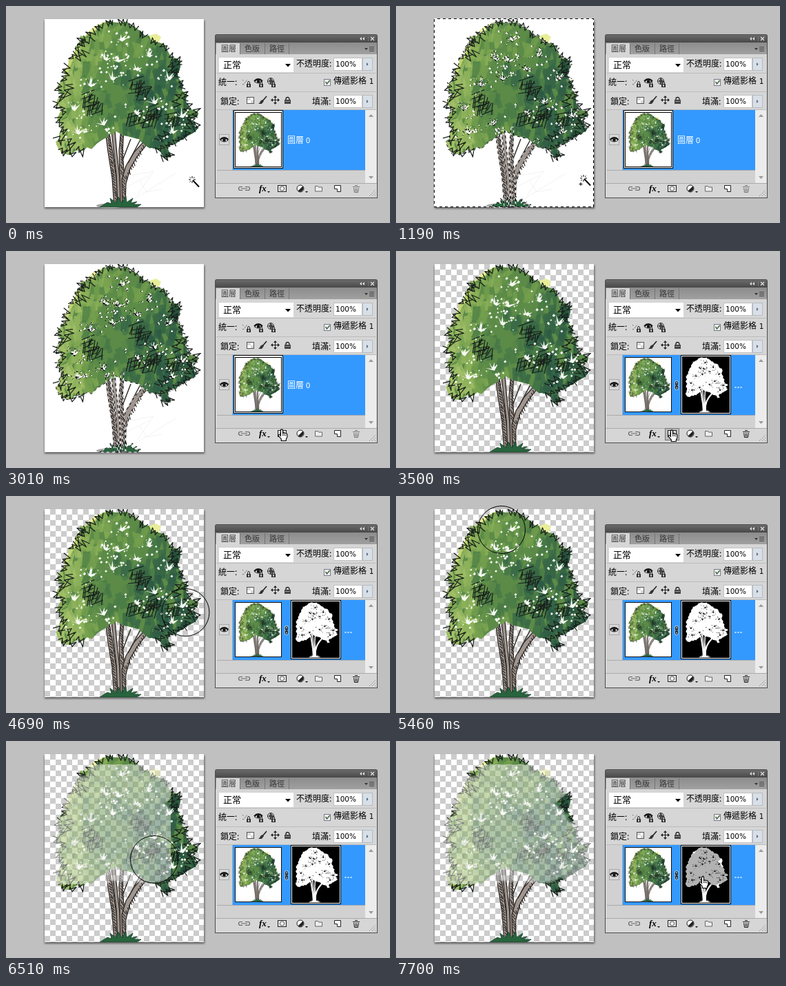
These frames come from a looping animation (557 by 315 pixels, 8000 ms). An HTML page:

```html
<!DOCTYPE html>
<html lang="zh-Hant">
<head>
<meta charset="utf-8">
<title>Layer mask</title>
<style>
html, body { margin: 0; width: 100%; height: 100%; overflow: hidden; background: #c0c0c0; }
svg { display: block; width: 557px; height: 315px; }
text { font: 12px "Noto Sans CJK TC", "Noto Sans CJK", "Noto Sans CJK JP", sans-serif; }
.tab { font-size: 11px; fill: #333; }
.num { font: 10.5px "DejaVu Sans", sans-serif; }
rect { shape-rendering: crispEdges; }
.ants path, .ants rect { fill: none; stroke-width: 1; }
.line { fill: none; stroke: #222; }
</style>
</head>
<body>
<svg viewBox="0 0 557 315" xmlns="http://www.w3.org/2000/svg">
  <defs>
    <pattern id="checker" x="56" y="19" width="16" height="16" patternUnits="userSpaceOnUse">
      <rect width="16" height="16" fill="#fff"/>
      <path d="M8 0h8v8h-8zM0 8h8v8h-8z" fill="#ccc"/>
    </pattern>
    <linearGradient id="bar" x2="0" y2="1">
      <stop stop-color="#6b6b6b"/><stop offset="1" stop-color="#484848"/>
    </linearGradient>
    <linearGradient id="tabs" x2="0" y2="1">
      <stop stop-color="#8c8c8c"/><stop offset="1" stop-color="#a0a0a0"/>
    </linearGradient>
    <filter id="soft" x="-10%" y="-10%" width="120%" height="120%"><feGaussianBlur stdDeviation="1.8"/></filter>
    <clipPath id="sheet"><rect x="56" y="19" width="231" height="273"/></clipPath>
    <clipPath id="crownClip"></clipPath>
    <clipPath id="silhouette"></clipPath>
    <mask id="fade" maskUnits="userSpaceOnUse" x="0" y="0" width="557" height="315">
      <rect width="557" height="315" fill="#fff"/>
      <path id="paint" fill="none" stroke="#000" stroke-opacity=".53" stroke-width="68" stroke-linecap="round" stroke-linejoin="round" filter="url(#soft)"/>
    </mask>
    <g id="tree"></g>
    <g id="backdrop">
      <rect x="56" y="19" width="231" height="273" fill="#fff"/>
      <ellipse cx="150" cy="290" rx="19" ry="3.5" fill="#a5a5a5"/>
      <path d="M181 246L214 240L190 275M186 280L246 243M194 254L204 270L226 266M176 262L208 246" fill="none" stroke="#efefef" stroke-width=".8"/>
    </g>
    <g id="hand">
      <path d="M-2.5-7.5q1.5-1.2 3 0v5l2-.6 1.8.9 1.6 0 1 1.4v4l-1.6 3v2.3h-7v-2.5l-4.3-5q0-2 2-1.3l1.5 1.6z" fill="#fff" stroke="#000" stroke-width="1.1"/>
      <path d="M.6-1.5v2.6M2.7-1.3v2.4M4.7-.6v2" stroke="#000" stroke-width=".9"/>
    </g>
    <g id="eye">
      <path d="M-5.500 1Q0-5 5.500 1Q0 5-5.500 1Z" fill="#eee" stroke="#222" stroke-width="1"/>
      <path d="M-6 0Q0-6 6 0" fill="none" stroke="#111" stroke-width="1.800"/>
      <circle r="2.300" cy=".5" fill="#111"/>
    </g>
    <g id="lock">
      <path d="M-1.500 0v-1.500a1.500 2 0 0 1 3 0v1.500" class="line"/>
      <rect x="-3" y="0" width="6" height="5" fill="#333"/>
      <rect x="-1" y="1" width="2" height="3" fill="#bbb"/>
    </g>
  </defs>

  <rect width="557" height="315" fill="#c0c0c0"/>
  <rect x="56" y="21" width="232" height="273" fill="#555" filter="url(#soft)"/>
  <rect x="56" y="19" width="231" height="273" fill="url(#checker)"/>
  <use id="paper" href="#backdrop"/>
  <g clip-path="url(#sheet)"><use href="#tree" mask="url(#fade)"/></g>
  <g id="ants" class="ants"></g>

  <g id="panel">
    <path d="M303 279V44q0-3 3-3h230q3 0 3 3v235z" fill="#4c4c4c"/>
    <path d="M304 53v-9q0-2 2-2h230q2 0 2 2v9z" fill="url(#bar)"/>
    <path d="M516 45l-3 2.5 3 2.5zM520 45l-3 2.5 3 2.5z" fill="#ddd"/>
    <path d="M525.500 44v7" stroke="#777"/>
    <path d="M529 45l5 5m0-5l-5 5" stroke="#ddd" stroke-width="1.3"/>
    <rect x="304" y="53" width="234" height="225" fill="#d6d6d6"/>
    <rect x="304" y="53" width="234" height="17" fill="url(#tabs)"/>
    <rect x="305" y="54" width="34" height="17" fill="#d6d6d6"/>
    <path d="M339.500 54v16M375.500 54v16M410.500 54v16" stroke="#757575"/>
    <text class="tab" x="312" y="66">圖層</text><text class="tab" x="346" y="66">色版</text><text class="tab" x="382" y="66">路徑</text>
    <path d="M520 61h5l-2.500 3z" fill="#333"/>
    <path d="M527 59.500h7M527 61.500h7M527 63.500h7M527 65.500h7" stroke="#444" stroke-width=".8"/>

    <rect x="309" y="75" width="108" height="21" fill="#fff"/>
    <text x="315" y="90" style="font-size:13px">正常</text>
    <path d="M405 84h8l-4 4.500z"/>
    <text x="421" y="88">不透明度:</text>
    <text x="308" y="115">統一:</text>
    <text x="311" y="143">鎖定:</text>
    <text x="444" y="143">填滿:</text>
    <text x="475" y="113">傳遞影格 <tspan class="num" dx="1">1</tspan></text>
    <g id="fields"></g>
    <path d="M305 97.500h232M305 124.500h232M305 150.500h232" stroke="#bcbcbc"/>

    <path d="M343 107l2 2M346 112l4-5M343 114l3-1" stroke="#666" stroke-dasharray="2 1"/>
    <use href="#lock" x="352" y="113"/>
    <use href="#eye" x="366" y="109"/><use href="#lock" x="370" y="113"/>
    <circle cx="384" cy="109" r="4.500" fill="#ddd" stroke="#222"/><path d="M384 105l3 4-3 4-2-4zM380 109h8" fill="#555" stroke="#333"/>
    <use href="#lock" x="388" y="113"/>
    <rect x="461.500" y="106.500" width="9" height="9" fill="#f4f4f4" stroke="#778"/>
    <path d="M463.500 110l2 3 4-5" fill="none" stroke="#464" stroke-width="1.500"/>

    <rect x="349.500" y="132.500" width="10" height="9" fill="#fff" stroke="#555"/>
    <path d="M350 133h5v4h-5zM355 137h4v4h-4z" fill="#d8d8d8"/>
    <path d="M378 131l-6 7" stroke="#222" stroke-width="1.600"/><path d="M372 136l2 2-3 4h-5q3-2 3-4z" fill="#333"/>
    <path d="M386 136.500h10M390.500 132v10" stroke="#222"/>
    <path d="M390.500 130l2.500 3h-5zM390.500 143l2.500-3h-5zM384 136.500l3-2.500v5zM397 136.500l-3-2.500v5z" fill="#222"/>
    <path d="M406 137v-2a2.500 2.500 0 0 1 5 0v2" class="line" stroke-width="1.300"/>
    <rect x="404" y="136" width="9" height="6" fill="#444"/><rect x="405" y="138" width="7" height="1" fill="#999"/>

    <rect x="306" y="151" width="215" height="106" fill="#d1d1d1"/>
    <rect x="329" y="151" width="192" height="87" fill="#39f"/>
    <path d="M306 238.500h215M328.500 151v87" stroke="#aaa"/>
    <rect x="309.500" y="186.500" width="14" height="15" fill="#d8d8d8" stroke="#a8a8a8"/>
    <use href="#eye" x="316.500" y="194"/>
    <rect x="521" y="151" width="16" height="106" fill="#ececec"/>
    <path d="M526 161h7l-3.500-4zM526 247h7l-3.500 4z" fill="#999"/>
    <rect x="332.500" y="154.500" width="67" height="79" fill="#fff" stroke="#111"/>
    <g transform="translate(333 155) scale(.287) translate(-56 -19)">
      <g clip-path="url(#sheet)"><use href="#backdrop"/><use href="#tree"/></g>
    </g>
    <g id="plain">
      <rect x="331" y="153" width="70" height="82" fill="none" stroke="#fff" stroke-width="2"/>
      <rect x="330.500" y="151.500" width="71" height="84" fill="none" stroke="#000"/>
      <rect x="332.500" y="154.500" width="67" height="79" fill="none" stroke="#000"/>
      <text x="408" y="199" fill="#fff">圖層 <tspan class="num">0</tspan></text>
    </g>
    <g id="masked">
      <rect x="404" y="188" width="6" height="14" rx="3" fill="#ddd" opacity=".6"/>
      <path d="M405.500 194v-3a1.500 1.500 0 0 1 3 0v3zM405.500 196v3a1.500 1.500 0 0 0 3 0v-3zM407 192v6" class="line" stroke-width="1.200"/>
      <rect x="414" y="152" width="71" height="84" fill="#fff"/>
      <rect x="413.500" y="151.500" width="72" height="85" fill="none" stroke="#000"/>
      <rect x="415" y="153" width="69" height="82"/>
      <g transform="translate(415 153.500) scale(.297) translate(-56 -19)">
        <g clip-path="url(#sheet)"><g clip-path="url(#silhouette)">
          <rect x="56" y="19" width="231" height="273" fill="#fff"/>
          <path id="thumbPaint" fill="none" stroke="#b2b2b2" stroke-width="69" stroke-linecap="round" stroke-linejoin="round"/>
        </g><path id="holes"/></g>
      </g>
      <path d="M491.500 198h2M495.500 198h2M499.500 198h2" stroke="#fff" stroke-width="1.500"/>
    </g>

    <path d="M304 257.500h234" stroke="#aaa"/>
    <rect id="button" x="390.500" y="257.500" width="20" height="17" fill="#bbb" stroke="#777"/>
    <g class="line">
      <path d="M343 262.500h-3a2.500 2.500 0 0 0 0 5h3M347 262.500h4a2.500 2.500 0 0 1 0 5h-4M341 265h9" stroke="#666" stroke-width="1.200"/>
      <rect x="394.500" y="260.500" width="12" height="9" fill="#e2e2e2"/>
      <circle cx="400.500" cy="265" r="3" fill="#fff" stroke="#555"/>
      <circle cx="427" cy="265" r="5" fill="#fff"/>
      <path d="M448.500 261.500h4l1 1.500h5v6h-10z" fill="#eee" stroke="#666"/>
      <path d="M476.500 260.500h9v9h-5v-4h-4z" fill="#fff"/>
      <path id="trash" d="M503 262.500h10M506 260.500h4M504.500 264l1 6.500h5l1-6.500M507 264.500v5M509 264.500v5"/>
    </g>
    <path d="M430.500 261.500a5 5 0 0 1-7 7z" fill="#222"/><path d="M434 269h4l-2 2zM379 269h4l-2 2z"/>
    <text x="367" y="269" style="font:italic bold 13px 'Liberation Serif',serif">fx</text>
    <path d="M527 276l9-9M531 276l5-5M535 276l1-1" stroke="#888" stroke-dasharray="1.500 1.500"/>
  </g>

  <g id="wand">
    <path d="M0-5v3M0 2v3M-5 0h3M2 0h3M-3.500-3.500l1.500 1.500M3.500-3.500l-1.500 1.500M-3.500 3.500l1.500-1.500" stroke="#000"/>
    <path d="M1 1l9 9.500" stroke="#000" stroke-width="2"/>
    <path id="plus" d="M-6.500 8.500h5M-4 6v5" stroke="#000"/>
  </g>
  <circle id="brush" r="34.500" fill="none" stroke="#000"/>
  <use id="pointer" href="#hand"/>
</svg>

<script>
const $ = id => document.getElementById(id);
const LOOP = 8000, STEP = 70;
let seed = 17;
const rnd = () => (seed = seed * 16807 % 2147483647) / 2147483647;
const jit = r => (rnd() * 2 - 1) * r;
const n1 = v => v.toFixed(1);
const path = (d, attrs) => `<path d="${d}" ${attrs || ''}/>`;
const pairs = s => s.split(' ').map(p => p.split(',').map(Number));

// Foliage
const edge = pairs('110,45 124,37 136,28 152,23 170,22 187,28 200,41 217,51 232,60 243,74 253,82 249,99 256,115 261,132 266,149 277,157 271,166 278,178 262,190 249,198 236,204 238,220 231,222 222,210 207,204 191,194 160,183 147,190 126,205 105,211 91,215 79,211 74,195 81,180 75,166 80,150 72,143 79,130 75,116 85,102 85,90 96,71 106,57');

function ragged(pts) {
  let d = '';
  pts.forEach(([x, y], i) => {
    const [u, v] = pts[(i + 1) % pts.length];
    for (let k = 0; k < 3; k++) {
      const f = k / 3;
      d += (d ? 'L' : 'M') + n1(x + (u - x) * f + jit(2.5)) + ' ' + n1(y + (v - y) * f + jit(2.5));
    }
  });
  return d + 'Z';
}

// Light towards the upper left, a dark band on the right below y = 82
function leafColor(x, y) {
  const band = y > 82 && x > 112 ? .2 : 0;
  const glow = y > 168 && x < 165 ? .12 : 0;
  const tone = .08 + (x - 70) / 210 * .6 + band - glow + jit(.13);
  const scale = ['#a3c068', '#8bb058', '#759f4e', '#5c8b48', '#477846', '#376746', '#2c5a44', '#234b3a'];
  return scale[Math.max(0, Math.min(7, Math.floor(tone * 8)))];
}

function dabs() {
  let s = '';
  for (let i = 0; i < 420; i++) {
    const x = 66 + rnd() * 214, y = 18 + rnd() * 200;
    s += path(`M${n1(x)} ${n1(y)}l${n1(jit(6))} ${n1(6 + rnd() * 10)}`,
      `stroke="${leafColor(x, y)}" stroke-width="${n1(6 + rnd() * 6)}" opacity=".75"`);
  }
  return s;
}

// Pen line that swings out from the crown and back
function spikes(x, y, n, size) {
  const a = Math.atan2(y - 125, x - 165);
  let d = `M${n1(x)} ${n1(y)}`;
  for (let i = 0; i < n; i++) {
    const out = (i % 2 ? -.5 : .7) * size + jit(2), along = (i - n / 2) * size * .45 + jit(2);
    d += `L${n1(x + Math.cos(a) * out - Math.sin(a) * along)} ${n1(y + Math.sin(a) * out + Math.cos(a) * along)}`;
  }
  return d;
}

function inkLines() {
  let d = '';
  edge.forEach(([x, y], i) => {
    if (i < 24 || i > 28) d += spikes(x + (165 - x) * .03, y + (125 - y) * .03, 5, 7);
  });
  pairs('112,70 119,52 92,120 90,195 247,138 240,95 225,190 262,172').forEach(([x, y]) => d += spikes(x, y, 6, 9));
  pairs('120,138 128,150 189,118 198,128 214,157 207,168 186,166 240,167').forEach(([x, y]) => {
    for (let k = -3; k < 4; k++) {
      d += `M${n1(x + k * 3 + 3 + jit(2))} ${n1(y - 8 + jit(4))}l${n1(-4 + jit(3))} ${n1(14 + jit(4))}`;
      if (k % 2) d += `M${n1(x - 9 + jit(3))} ${n1(y + k * 3)}l${n1(18 + jit(4))} ${n1(-5 + jit(3))}`;
    }
  });
  return d;
}

function specks() {
  let d = '';
  const dot = (x, y, r) => d += `M${n1(x - r)} ${n1(y)}l${n1(r)} ${n1(-r * 1.2)}l${n1(r * 1.1)} ${n1(r)}l${n1(-r)} ${n1(r)}Z`;
  pairs('167,49 144,77 162,79 154,106 207,72 236,105 122,115 98,150 190,156 215,140 104,184 241,183 255,160 141,171 189,92').forEach(([x, y]) => {
    for (let k = 0; k < 5; k++) {
      const a = -2.9 + k * .62 + jit(.3), len = 5 + rnd() * 9;
      d += `M${n1(x - 2)} ${n1(y)}L${n1(x + Math.cos(a) * len)} ${n1(y + Math.sin(a) * len)}L${n1(x + 1.8)} ${n1(y + 2.8)}Z`;
    }
    for (let k = 0; k < 10; k++) dot(x + jit(18), y + jit(14), .8 + rnd() * 1.5);
  });
  return d;
}

const crown = ragged(edge), holes = specks();
const trunks = [
  'M144 181L149 179L155 215L160 250L164 292H157L154 250L148 212Z',
  'M153 181L158 181L161 215L165 250L167 292H162L160 245L156 210Z',
  'M167 176L171 176L169 215L172 250L174 292H166L165 245L164 210Z',
  'M204 192L209 195L190 219L180 236L174 258L173 290H169L168 252L174 232L186 212Z'
];
const grass = 'M136 292L147 285L153 287L151 279L160 286L163 277L168 286L174 276L175 285L184 279L181 286L190 284L185 288L196 288L190 292Z';
const solid = [crown, ...trunks, grass];

function bark() {
  let d = '';
  for (let y = 186; y < 284; y += 4) {
    d += `M${n1(146 + (y - 180) * .12)} ${y}l4 ${n1(4 + jit(2))}M${n1(166 + (y > 245) * 3 + jit(1))} ${y}l4 5`;
    if (y < 246) d += `M${n1(203 - (y - 190) * .56)} ${y + 4}l2 ${n1(5 + jit(2))}`;
  }
  return d;
}

$('crownClip').innerHTML = path(crown);
$('silhouette').innerHTML = solid.map(d => path(d)).join('');
$('holes').setAttribute('d', holes);
$('tree').innerHTML =
  path('M82 112L92 80L108 50L126 31L145 22L132 48L108 76Z', 'fill="#edf09b"') +
  path('M205 44L218 40L225 45L220 55L208 53Z', 'fill="#e8ee98"') +
  trunks.map(d => path(d, 'fill="#a0958f" stroke="#26231f" stroke-width="1.2"')).join('') +
  path(bark(), 'fill="none" stroke="#2b2725" stroke-width="1.2"') +
  path('M181 193L169 224M196 192L177 228', 'fill="none" stroke="#332e2a" stroke-width="1.5"') +
  path(grass, 'fill="#28643d" stroke="#193f29" stroke-width=".8"') +
  path(crown, 'fill="#5c8b48"') +
  `<g clip-path="url(#crownClip)" fill="none" stroke-linecap="square">${dabs()}` +
  path('M84 104L92 82L106 59M114 42L128 34', 'stroke="#dce57b" stroke-width="6" opacity=".7"') + '</g>' +
  path(inkLines(), 'fill="none" stroke="#18211b" stroke-width="1.25" stroke-linejoin="round"') +
  path(holes, 'fill="#f6faf2"');

// Selection outline: white line below, marching black dashes above
const outlines = solid.map(d => path(d)).join('');
const frame = '<rect class="frame" x="55.5" y="18.5" width="231" height="273"/>';
$('ants').innerHTML = `<g stroke="#fff">${outlines}${frame}</g>` +
  `<g id="dashes" stroke="#000" stroke-dasharray="4 4">${outlines}${frame}${path(holes, 'stroke-dasharray="2 6"')}</g>`;
const frames = document.querySelectorAll('.frame');

let fields = '';
for (const y of [75, 129]) fields +=
  `<rect x="475.5" y="${y}.5" width="41" height="18" fill="#fff" stroke="#c2c2c2"/>
   <text class="num" x="478" y="${y + 13}">100%</text>
   <rect x="517.5" y="${y}.5" width="14" height="18" fill="#d9dfe6" stroke="#b4bcc4"/>
   <path d="M523 ${y + 7}l2.500 2.500-2.500 2.500z" fill="#468"/>`;
$('fields').innerHTML = fields;

// Motion: time, x, y
const route = [
  [0, 270, 252], [560, 270, 252], [630, 272, 250], [2450, 272, 250], [3010, 401, 267],
  [4200, 401, 267], [5040, 160, 99], [5460, 153, 49],
  [5530, 180, 52], [5600, 224, 52], [5670, 188, 80], [5740, 115, 85], [5810, 168, 105], [5880, 96, 140],
  [5950, 122, 138], [6020, 90, 161], [6090, 77, 180], [6160, 105, 193], [6230, 150, 165], [6300, 205, 126],
  [6370, 215, 122], [6440, 165, 170], [6510, 215, 172], [6580, 245, 150], [6650, 275, 185],
  [6860, 275, 185], [7420, 446, 204], [LOOP, 446, 204]
];
const PAINT_START = 5460, PAINT_END = 6650;
const MARCH = [770, 840, 1050, 1190, 1400, 1470, 1610, 1750, 1890, 1960, 2170, 2310, 2520, 2660, 2870, 3010, 3220, 3360];

function place(t) {
  const i = Math.max(1, route.findIndex(k => k[0] >= t));
  const [a, x, y] = route[i - 1], [b, u, v] = route[i];
  const f = (t - a) / (b - a);
  return [x + (u - x) * f, y + (v - y) * f];
}

function strokeTo(t) {
  if (t <= PAINT_START) return '';
  const end = Math.min(t, PAINT_END);
  const pts = route.filter(k => k[0] >= PAINT_START && k[0] < end).map(k => [k[1], k[2]]);
  return 'M' + pts.concat([place(end)]).map(p => p.join(' ')).join('L');
}

const show = (id, on) => $(id).setAttribute('display', on ? 'inline' : 'none');

function draw(ms) {
  const t = Math.floor(ms / STEP) * STEP;
  const [x, y] = place(t);
  const masked = t >= 3430, overPanel = x > 303;

  show('paper', !masked);
  show('plain', !masked);
  show('masked', masked);
  $('trash').setAttribute('stroke', masked ? '#222' : '#777');
  show('button', t >= 3360 && t < 4060);

  show('ants', t >= 770 && !masked);
  frames.forEach(f => f.setAttribute('display', t < 1750 ? 'inline' : 'none'));
  $('dashes').setAttribute('stroke-dashoffset', -MARCH.filter(m => m <= t).length);

  const stroke = strokeTo(t);
  $('paint').setAttribute('d', stroke);
  $('thumbPaint').setAttribute('d', t >= PAINT_END ? stroke : '');

  show('wand', !masked && !overPanel);
  show('plus', t >= 630);
  show('brush', masked && !overPanel);
  show('pointer', overPanel);
  const press = (t >= 3360 && t < 3640) || t >= 7700 ? 1 : 0;
  $('wand').setAttribute('transform', `translate(${x} ${y})`);
  $('brush').setAttribute('transform', `translate(${x} ${y})`);
  $('pointer').setAttribute('transform', `translate(${x} ${y + press})`);
}

function tick() {
  draw(performance.now() % LOOP);
  requestAnimationFrame(tick);
}
tick();
</script>
</body>
</html>
```
